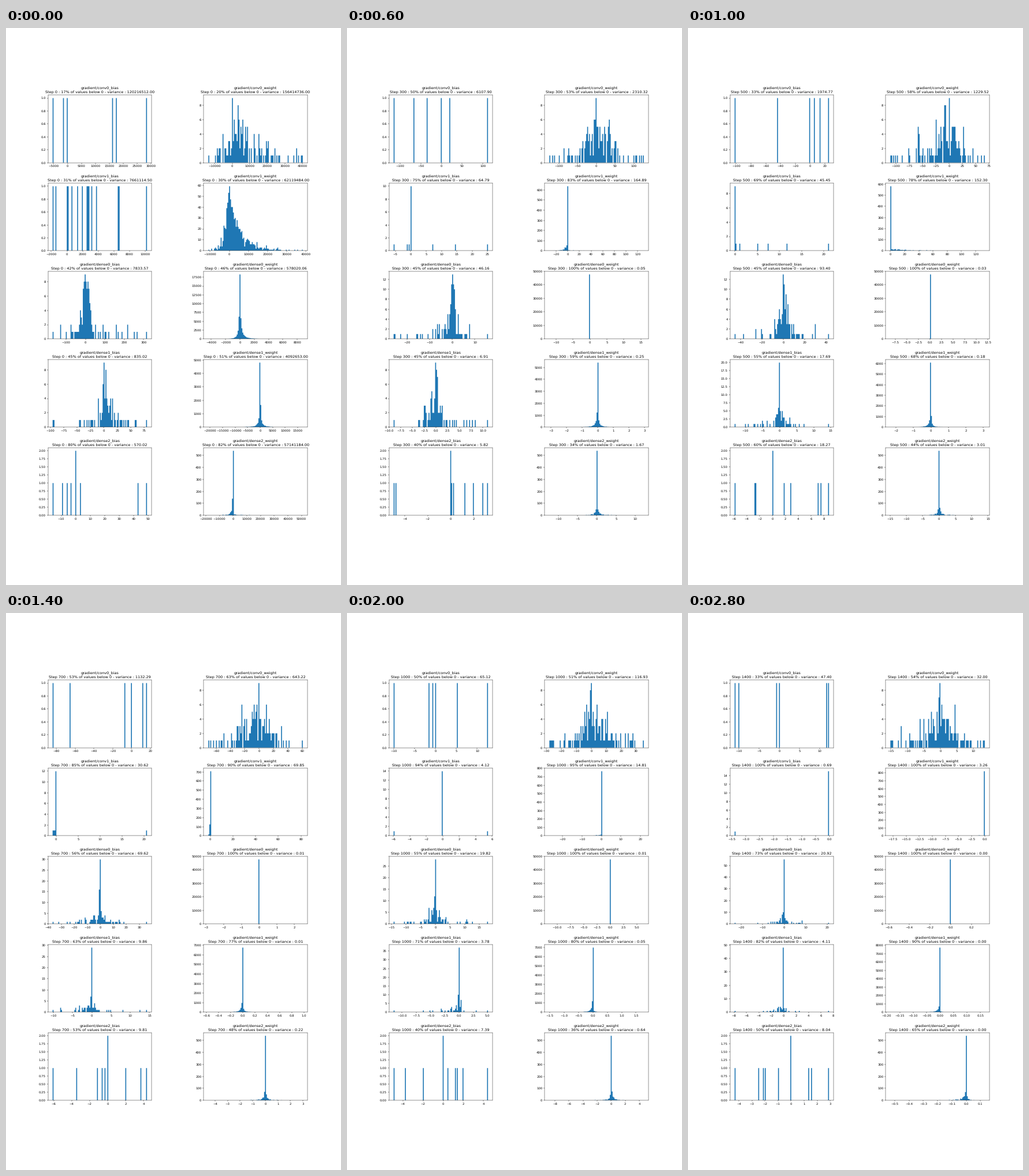
Animation of 580x966 px, one loop 3000 ms. Source, as a matplotlib script:

```python
import numpy as np
import matplotlib.pyplot as plt
from matplotlib.animation import FuncAnimation

W, H, DPI = 580, 966, 64
K = 580 / 15 / DPI          # scale of a 15 inch wide layout
FRAMES, BINS = 15, 100
KEYS = [0, 3, 5, 8, 10, 12, 14]

plt.rcParams.update({
    "font.family": "DejaVu Sans", "font.size": 10 * K,
    "axes.titlesize": 12 * K, "axes.titlepad": 6 * K, "axes.linewidth": 0.8 * K,
    "text.hinting": "none",
})
for a in ("xtick", "ytick"):
    plt.rcParams.update({a + ".major.size": 3.5 * K, a + ".major.pad": 3.5 * K,
                         a + ".major.width": 0.8 * K, a + ".labelsize": 10 * K})


def mix(keys, i):
    """Value at frame i: geometric between keys of one sign, else linear."""
    j = np.searchsorted(KEYS, i, side="right") - 1
    if KEYS[j] == i:
        return keys[j]
    t = (i - KEYS[j]) / (KEYS[j + 1] - KEYS[j])
    a, b = keys[j], keys[j + 1]
    if a * b > 0:
        return np.sign(a) * abs(a) ** (1 - t) * abs(b) ** t
    return a + (b - a) * t


class Panel:
    """Histogram of n values: a spike at zero and seeded values around it.

    The spike holds a share of n that is linear in the part below zero;
    width and power shape the spread on either side, in bins.
    """

    def __init__(self, name, n, spike, width, power, below, var, lo, hi):
        self.name, self.n, self.spike = name, n, spike
        self.width, self.power = width, power
        self.below, self.var, self.lo, self.hi = below, var, lo, hi

    def state(self, i):
        return [mix(k, i) for k in (self.below, self.var, self.lo, self.hi)]

    def counts(self, i):
        below, _, lo, hi = self.state(i)
        part = below / 100
        base, slope = self.spike
        top = max(1, round(self.n * (base + slope * part)))
        rest = max(self.n - top - 2, 0)

        zero = np.clip(-lo / (hi - lo) * BINS, 0, BINS - 0.01)
        c = int(zero)
        rng = np.random.default_rng([self.n, i])
        dist = self.width * rng.exponential(size=8 * rest) ** self.power
        left = rng.random(8 * rest) < part
        x = zero + dist * np.where(left, -zero, BINS - zero) / (BINS / 2)
        x = x[(x >= 0) & (x < BINS) & (x.astype(int) != c)][:rest]

        h = np.histogram(x, BINS, (0, BINS))[0]
        h = np.minimum(h, max(1, int(0.9 * top)))
        h[[0, -1]] = np.maximum(h[[0, -1]], 1)
        h[c] = top
        return h


panels = [
    Panel("conv0_bias", 6, (0, 0), 40, 0.7,
          below=[17, 50, 33, 67, 50, 50, 33],
          var=[120216512, 6107.9, 1974.77, 857.39, 65.12, 503.23, 47.4],
          lo=[-5370, -115.7, -102.2, -76.2, -10.1, -50.3, -11.1],
          hi=[28510, 112.3, 25.7, 13.3, 12.6, 12.4, 12.3]),
    Panel("conv0_weight", 150, (0.06, 0), 14, 1,
          below=[20, 53, 58, 65, 51, 49, 54],
          var=[156414736, 2310.32, 1229.52, 465.23, 116.93, 596.11, 32],
          lo=[-13660, -125.6, -110.4, -56.6, -28.1, -67.4, -15.1],
          hi=[40270, 126.7, 67.2, 57.8, 35.2, 91.6, 13.4]),
    Panel("conv1_bias", 16, (-0.31, 1.26), 25, 1,
          below=[31, 75, 69, 94, 94, 88, 100],
          var=[7661114.5, 64.79, 45.45, 25.13, 4.12, 24.07, 0.69],
          lo=[-1838, -5.6, -0.1, -2.25, -5.95, -4.6, -3.41],
          hi=[10244, 25.15, 21.2, 20.4, 5.5, 18.7, -0.01]),
    Panel("conv1_weight", 864, (-0.31, 1.26), 8, 1.1,
          below=[30, 83, 78, 96, 95, 93, 100],
          var=[62119484, 164.89, 152.3, 47.3, 14.81, 76.84, 3.26],
          lo=[-10940, -31.6, -0.1, -7.4, -26.7, -20.4, -18],
          hi=[38460, 130.6, 132.8, 64, 21.7, 95.6, 0.01]),
    Panel("dense0_bias", 120, (-0.45, 1.25), 6, 1.5,
          below=[42, 45, 45, 62, 55, 46, 73],
          var=[7833.57, 46.16, 93.4, 60.11, 19.82, 64.77, 20.92],
          lo=[-169, -25.9, -45.8, -32.9, -14.3, -30.7, -23],
          hi=[317, 15.8, 42.6, 33, 18, 33.9, 20.8]),
    Panel("dense0_weight", 48150, (-0.14, 1.13), 1, 2,
          below=[46, 100, 100, 100, 100, 100, 100],
          var=[578020.06, 0.05, 0.03, 0.003, 0.01, 0.003, 0.001],
          lo=[-4410, -11.95, -8.6, -1.66, -11.5, -2.45, -0.584],
          hi=[8790, 15.9, 11.8, 1.13, 6.3, 3.16, 0.33]),
    Panel("dense1_bias", 84, (-0.45, 1.25), 6, 1.5,
          below=[45, 45, 55, 68, 71, 57, 82],
          var=[835.02, 6.91, 17.69, 7.36, 3.78, 14.47, 4.11],
          lo=[-96, -9, -13.2, -9, -11.5, -18.6, -7.9],
          hi=[80.8, 11.1, 14.5, 14.3, 5.1, 12.2, 7.3]),
    Panel("dense1_weight", 10080, (0.1, 0.74), 1.2, 2,
          below=[51, 59, 68, 82, 80, 71, 90],
          var=[4092653, 0.25, 0.18, 0.002, 0.05, 0.02, 0.001],
          lo=[-20700, -3.1, -2.32, -0.279, -1.52, -0.8, -0.185],
          hi=[17000, 2.94, 3.08, 0.552, 1.77, 0.944, 0.166]),
    Panel("dense2_bias", 10, (0.2, 0), 35, 0.8,
          below=[80, 40, 60, 50, 40, 40, 50],
          var=[570.02, 5.82, 18.27, 7.19, 7.39, 15.16, 8.04],
          lo=[-15.9, -4.98, -5.9, -6.25, -4.93, -6.67, -4.32],
          hi=[49.1, 3.25, 8.8, 3.1, 4.45, 5.8, 2.9]),
    Panel("dense2_weight", 840, (0.64, 0), 1.2, 2,
          below=[82, 34, 44, 50, 36, 40, 65],
          var=[57141184, 1.67, 3.01, 0.06, 0.64, 0.24, 0.002],
          lo=[-18140, -12.3, -14.9, -2.5, -8.8, -4.47, -0.531],
          hi=[50970, 12.2, 14, 1.38, 4.64, 2.15, 0.13]),
]

fig, axes = plt.subplots(5, 2, figsize=(W / DPI, H / DPI), dpi=DPI, facecolor="white")
fig.subplots_adjust(left=0.125, right=0.9, bottom=0.125, top=0.88, wspace=0.5, hspace=0.3)
bars = [ax.stairs(np.ones(BINS), np.arange(BINS + 1), fill=True,
                  facecolor="#1f77b4", linewidth=0, snap=False) for ax in axes.flat]


def draw(i):
    for ax, bar, panel in zip(axes.flat, bars, panels):
        below, var, lo, hi = panel.state(i)
        counts = panel.counts(i)
        bar.set_data(counts, np.linspace(lo, hi, BINS + 1))
        pad = 0.05 * (hi - lo)
        ax.set_xlim(lo - pad, hi + pad)
        ax.set_ylim(0, counts.max() * 1.05)
        ax.set_title(f"gradient/{panel.name}\nStep {i * 100} : {below:.0f}% of values"
                     f" below 0 - variance : {var:.2f}")
    return bars


anim = FuncAnimation(fig, draw, frames=FRAMES, interval=200, repeat=True, repeat_delay=0)
plt.show()
```
